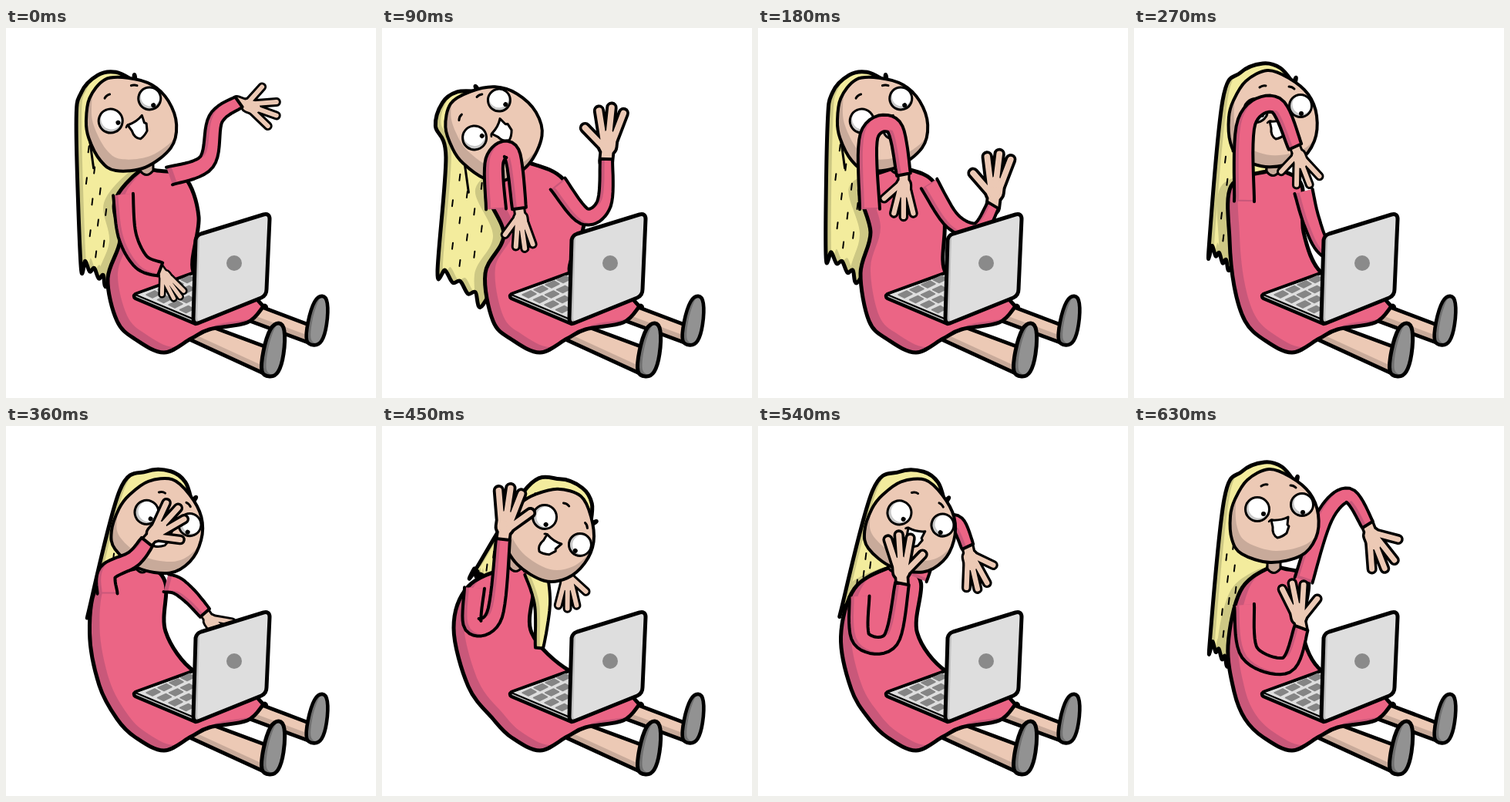
These frames come from a looping animation (480x480 px, 720 ms). An HTML page:

```html
<!DOCTYPE html>
<html lang="en">
<head>
<meta charset="utf-8">
<title>Laptop dance</title>
<style>
html, body { margin: 0; width: 100%; height: 100%; overflow: hidden; background: #fff; }
svg { display: block; width: 100%; height: 100%; }
svg * { stroke-linejoin: round; stroke-linecap: round; }
.pose { visibility: hidden; animation: show 720ms step-end infinite; }
@keyframes show {
  0% { visibility: visible; }
  12.5%, 100% { visibility: hidden; }
}
</style>
</head>
<body>
<svg id="stage" viewBox="0 0 480 480"></svg>
<script>
const STEP = 90, COUNT = 8, RAD = Math.PI / 180;
const PINK = ['#eb6585', '#c9587a'], SKIN = ['#ecc9b5', '#c8aa9a'],
  HAIR = ['#f3ec9d', '#cdc884'], SHOE = ['#929292', '#707070'];
let clipId = 0;

const pairs = n => n.flatMap((v, i) => i % 2 ? [] : [[v, n[i + 1]]]);
const mix = (a, b, t) => a.map((v, i) => v + (b[i] - v) * t);
const turned = ([x, y], deg) => {
  const c = Math.cos(deg * RAD), s = Math.sin(deg * RAD);
  return [x * c - y * s, x * s + y * c];
};

// Smooth closed outline; a repeated point makes a corner.
function outline(pts) {
  const at = i => pts[(i + pts.length) % pts.length];
  const pull = (p, q, r) => p.map((v, k) => (v + (r[k] - q[k]) / 6).toFixed(1));
  return pts.reduce((d, b, i) => {
    const a = at(i - 1), c = at(i + 1), e = at(i + 2);
    return d + `C${pull(b, a, c)} ${pull(c, e, b)} ${c}`;
  }, 'M' + pts[0]);
}
const line = (d, w = 3) => `<path d="${d}" fill="none" stroke="#000" stroke-width="${w}"/>`;
const fill = (d, color, w = 3) => `<path d="${d}" fill="${color}" stroke="#000" stroke-width="${w}"/>`;

// Dark shape with its light copy shifted inside it; extra marks stay inside too.
function shade(d, [light, dark], dx, dy, extra = '') {
  const id = 'c' + clipId++;
  return `<clipPath id="${id}"><path d="${d}"/></clipPath><path d="${d}" fill="${dark}"/>
    <g clip-path="url(#${id})"><path d="${d}" fill="${light}" transform="translate(${dx} ${dy})"/>${extra}</g>`;
}
const solid = (pts, colors, dx, dy, w = 5, extra) =>
  shade(outline(pts), colors, dx, dy, extra) + line(outline(pts), w);

// Tapering tube along a smooth centre line, open at its first end.
function limb(flat, w0, w1, colors) {
  const p = pairs(flat), last = p.length - 1, sides = [[], []];
  const pos = u => {
    const i = Math.min(last - 1, Math.floor(u)), t = u - i;
    const [a, b, c, d] = [p[Math.max(0, i - 1)], p[i], p[i + 1], p[Math.min(last, i + 2)]];
    return b.map((v, k) => v + t / 2 * (c[k] - a[k] + t * (2 * a[k] - 5 * v + 4 * c[k] - d[k]
      + t * (3 * v - a[k] - 3 * c[k] + d[k]))));
  };
  for (let k = 0; k <= 30; k++) {
    const u = k / 30 * last, [x, y] = pos(u);
    const a = pos(Math.max(0, u - .02)), b = pos(Math.min(last, u + .02));
    const len = Math.hypot(b[0] - a[0], b[1] - a[1]), w = w0 + (w1 - w0) * k / 30;
    const nx = (a[1] - b[1]) / len * w, ny = (b[0] - a[0]) / len * w;
    sides[0].push([(x + nx).toFixed(1), (y + ny).toFixed(1)]);
    sides[1].unshift([(x - nx).toFixed(1), (y - ny).toFixed(1)]);
  }
  const d = 'M' + sides.flat().join('L');
  return shade(d, colors, 6, -2) + line(d, 4);
}

// Three fingers and a thumb, drawn as rounded strokes with a rim.
function hand([x, y], angle, [, spread, size], flip) {
  let fingers = '';
  const finger = (fx, fy, deg, len) =>
    fingers += `M${fx} ${fy}l${turned([len, 0], deg)}`;
  for (const k of [-1, 0, 1]) finger(24, k * 6, k * spread, 37 - 4 * Math.abs(k));
  finger(14, 5, 20 + 2 * spread, 31);
  const pass = (color, rim) => [['M-3 0H20', 12], ['M15 0H25', 18], [fingers, 7]]
    .map(([d, w]) => `<path d="${d}" fill="none" stroke="${color}" stroke-width="${w + rim}"/>`).join('');
  return `<g transform="translate(${x} ${y}) rotate(${angle}) scale(${size} ${size * flip})">` +
    pass('#000', 7) + pass(SKIN[0], 0) + '</g>';
}
function arm(flat, grip, flip, w0, w1) {
  const [a, b] = pairs(flat).slice(-2);
  const angle = Math.atan2(b[1] - a[1], b[0] - a[0]) / RAD + grip[0];
  return hand(b, angle, grip, flip) + limb(flat, w0, w1, PINK);
}

function eye(x, y, r, px, py) {
  return `<circle cx="${x}" cy="${y}" r="${r}" fill="#c9c9c9"/>
    <circle cx="${x + 2}" cy="${y - 2}" r="${r - 2}" fill="#fff"/>
    <circle cx="${x}" cy="${y}" r="${r}" fill="none" stroke="#000" stroke-width="3"/>
    <circle cx="${x + px}" cy="${y + py}" r="3"/>`;
}
function head([x, y, tilt, chin]) {
  const jaw = [-62, 42, -49, 61, -12, 72, 28, 63, 47, 40].map((v, i) => i % 2 ? v * chin : v);
  const face = [-64, 12, ...jaw, 50, 10, 39, -18, 14, -39, -14, -49, -42, -35, -58, -10];
  return `<g transform="translate(${x} ${y}) rotate(${tilt})">` +
    solid(pairs(face), SKIN, ...turned([7, -15], -tilt), 4) +
    fill('M-11 17Q2 18 11 13L10 23L12 25L9 34Q3 39 -3 40Q-10 36 -9 26Z', '#fff') +
    line('M-14 19Q-12 16 -9 17', 2.5) +
    eye(-29, 3, 15.5, 8, 6) + eye(29, -3, 14.5, 1, 10) +
    line('M-24 -27Q-20 -30 -16 -29M14 -28Q18 -28 21 -25') + '</g>';
}
const neck = ([x, y]) => fill(`M${x} ${y - 12}V${y}Q${x + 8} ${y + 11} ${x + 17} ${y}V${y - 12}`, SKIN[1]);

function torso({ neck: [x, y], right, left }) {
  const hem = [244, 318, 300, 330, 334, 361, 334, 361, 313, 382, 264, 391, 240, 403, 205, 421, 168, 404, 144, 380];
  return pairs([x, y, x + 22, y, ...right, ...hem, ...left]);
}

// The crown follows the head, the rest hangs down to a ragged tail.
function hair({ head: [hx, hy, tilt], tail, left, neck }, body) {
  const place = p => { const [x, y] = turned(p, tilt); return [hx + x, hy + y]; };
  const crown = pairs([20, -32, 20, -32, 3, -52, -20, -58, -49, -46, -72, -10]).map(place);
  const [a, b] = pairs(tail), side = crown[5], cheek = place([-64, 15]);
  const ends = [0, 1, 2, 3, 4, 5, 6].map(i => {
    const [x, y] = mix(a, b, i / 6);
    return [x, y + (i % 2 ? -5 : 4)];
  });
  let ticks = '';
  for (let k = 1; k < 13; k++) {
    const [x, y] = mix(side, a, k / 13);
    ticks += `M${x + 9 + (k * .618 % 1) * (b[0] - a[0]) * .8} ${y}l-1 8`;
  }
  const shadow = `<path d="${outline(body)}" fill="${HAIR[1]}" transform="translate(-14 2)"/>`;
  return solid([...crown, ...ends, [left[2] + 15, left[3]], neck], HAIR, 7, -4, 5, shadow + line(ticks, 2)) +
    line(`M${cheek}l5 36`);
}

// Left and right run along the sides of the body; grips are bend, finger spread and size.
const keys = [
  { head: [161, 106, -24, 1.06], neck: [174, 185], tail: [97, 303, 132, 330],
    left: [132, 325, 148, 275, 141, 225], right: [232, 194, 250, 245],
    near: [152, 216, 157, 268, 175, 303, 200, 313], nearGrip: [32, 9, .72],
    far: [212, 192, 260, 174, 272, 118, 302, 96], farGrip: [56, 24, .85] },
  { head: [136, 118, -51, 1.1], neck: [172, 176], tail: [72, 312, 131, 355],
    left: [134, 318, 158, 268, 135, 208], right: [235, 196, 262, 250],
    near: [148, 235, 146, 172, 168, 162, 178, 234], nearGrip: [0, 12, .86],
    far: [228, 202, 262, 244, 288, 228, 291, 170], farGrip: [3, 15, 1.1] },
  { head: [160, 106, -24, 1.06], neck: [172, 183], tail: [88, 290, 130, 325],
    left: [133, 318, 146, 265, 132, 205], right: [228, 200, 242, 250],
    near: [145, 235, 144, 140, 176, 128, 189, 190], nearGrip: [12, 14, .9],
    far: [222, 202, 252, 250, 285, 262, 305, 230], farGrip: [-25, 14, 1.1] },
  { head: [187, 104, 0, 1.06], neck: [172, 186], tail: [97, 283, 124, 310],
    left: [130, 335, 124, 275, 126, 205], right: [218, 205, 220, 265],
    near: [143, 225, 146, 122, 184, 100, 209, 154], nearGrip: [4, 22, .86],
    far: [220, 212, 230, 250, 246, 285, 275, 300], farGrip: [0, 12, .8] },
  { head: [234, 136, 44, 1], neck: [165, 183], tail: [118, 188, 130, 199],
    left: [112, 338, 93, 262, 112, 208], right: [197, 208, 194, 268],
    near: [120, 210, 118, 258, 146, 245, 157, 147], nearGrip: [2, 13, 1.1],
    far: [195, 195, 215, 165, 235, 160, 241, 185], farGrip: [14, 14, .85],
    lock: [200, 190, 208, 232, 204, 288] },
  { head: [189, 105, 0, 1], neck: [173, 185], tail: [98, 280, 122, 308],
    left: [130, 345, 122, 285, 138, 214], right: [226, 200, 219, 268],
    near: [143, 232, 150, 294, 198, 310, 217, 262], nearGrip: [-33, 15, .97],
    far: [220, 200, 247, 118, 278, 90, 303, 128], farGrip: [12, 17, 1] }
];
function between(a, b) {
  const pose = {};
  for (const k in a) if (k !== 'lock') pose[k] = mix(a[k], b[k], .5);
  return pose;
}
const [reach, lean, sway, cover, greet, swing] = keys;
const poses = [reach, lean, sway, cover, between(cover, greet), greet, between(greet, swing), swing];

function back(p) {
  const body = torso(p);
  return hair(p, body) + solid(body, PINK, 13, -7) + arm(p.far, p.farGrip, -1, 12, 8) +
    (p.lock ? limb(p.lock, 15, 5, HAIR) : '') + neck(p.neck) + head(p.head);
}
const front = p => arm(p.near, p.nearGrip, 1, 13, 9);

const shoe = (x, y, s) =>
  `<g transform="translate(${x} ${y}) scale(${s})">` +
  solid(pairs([-14, 26, -12, 0, -3, -28, 8, -36, 15, -26, 14, 4, 7, 27, -4, 33]), SHOE, 6, -2) + '</g>';
const leg = (x1, y1, x2, y2, x3, y3, x4, y4) => {
  const d = `M${x1} ${y1}L${x2} ${y2}L${x3} ${y3}L${x4} ${y4}Z`;
  return shade(d, SKIN, 3, -8) + line(d, 5);
};
const legs = leg(300, 374, 324, 359, 398, 387, 392, 408) + shoe(403, 381, .92) +
  leg(236, 403, 268, 388, 338, 414, 332, 447) + shoe(346, 419, 1);

function laptop() {
  let pads = '';
  for (let i = 0; i < 4; i++) for (let j = 0; j < 4; j++) {
    const x = 191 + 14.5 * i + 15 * j, y = 346 + 6.5 * i - 6.5 * j;
    if (x < 242) pads += `M${x - 9} ${y}l11 -5l7 4l-10 5Z`;
  }
  const lid = 'M253 267L334 242Q342 240 342 248L338 339Q338 347 331 350L249 383Q243 384 243 377L246 275Q247 269 253 267Z';
  return fill('M168 345L242 318L246 384L168 351Q164 348 168 345Z', '#c0c0c0', 4.5) +
    '<path d="M170 346L243 320V376Z" fill="#dedede"/>' +
    `<path d="${pads}" fill="#858585" stroke="#858585" stroke-width="1.5"/>` +
    line('M168 346L244 378', 2) +
    shade(lid, ['#dedede', '#c0c0c0'], 5, -2) + line(lid, 5) +
    '<circle cx="296" cy="305" r="10" fill="#8a8a8a"/>';
}

const layer = draw => poses.map((p, i) =>
  `<g class="pose" style="animation-delay:${(i - COUNT) * STEP}ms">${draw(p)}</g>`).join('');
document.getElementById('stage').innerHTML = legs + layer(back) + laptop() + layer(front);
</script>
</body>
</html>
```
